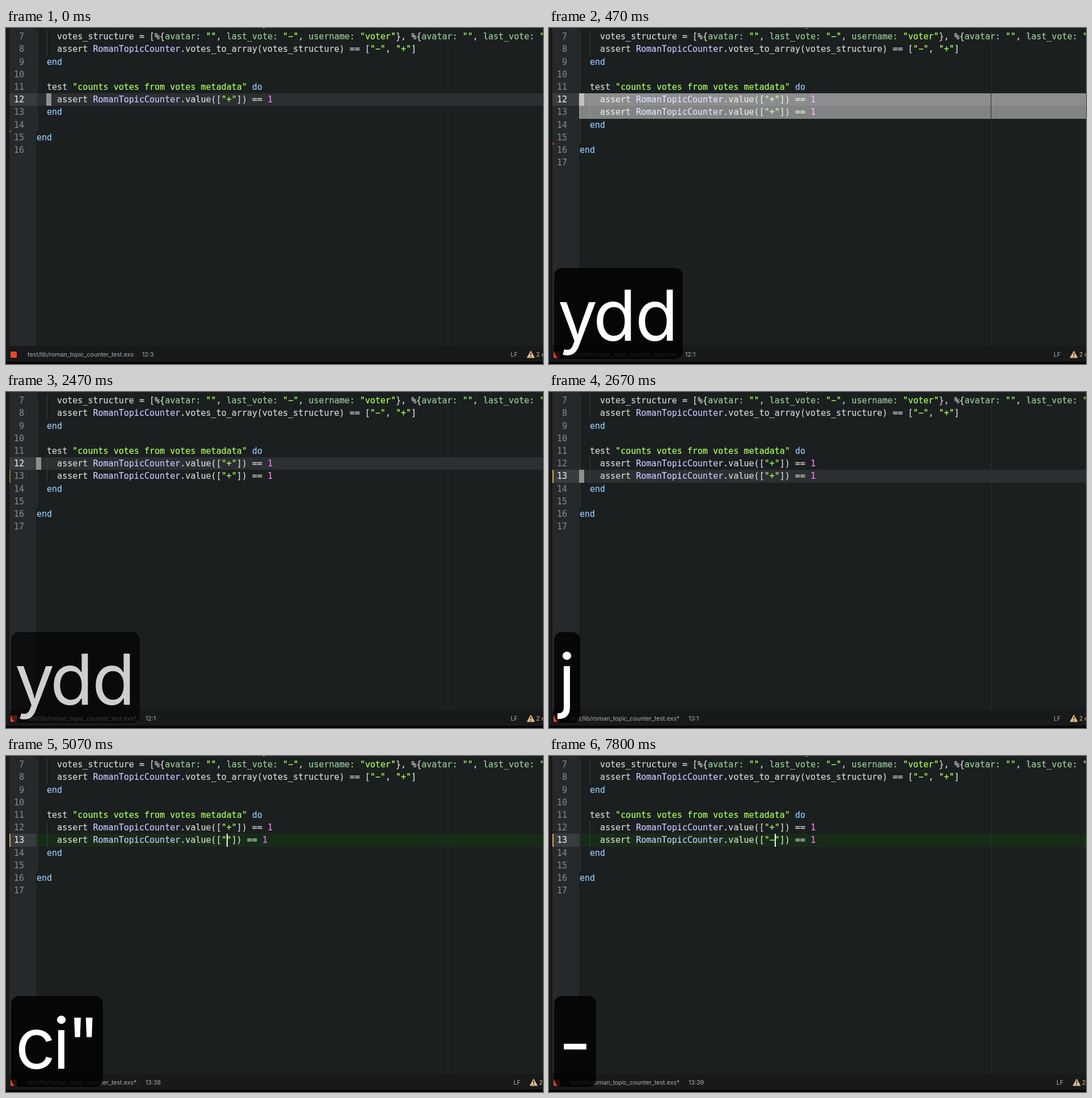
Write an HTML page that moves like this. It is 947 px wide and 592 px high and loops after 8000 ms.

```html
<!DOCTYPE html>
<html lang="en">
<head>
<meta charset="utf-8">
<title>Editor key presses</title>
<style>
  html, body { margin: 0; width: 100%; height: 100%; overflow: hidden; background: #17191a; }
  #stage { position: relative; width: 947px; height: 592px; overflow: hidden; background: #17191a; }
  #stage div, #stage svg, #stage i { position: absolute; }
  #editor { left: 6px; top: 0; width: 941px; height: 560px; background: #1b1f1f; }
  #gutter { left: 6px; top: 0; width: 47px; height: 560px; background: #25292b; }
  #view { left: 0; top: 0; width: 947px; height: 560px; overflow: hidden; }
  #wrap { left: 779px; top: 0; width: 1px; height: 560px; background: #2a2e2e; }
  .row { left: 53px; right: 0; height: 22.2px; background: #2b2f31; }
  .row.insert { background: #172c18; }
  .mark { left: 6px; width: 47px; height: 22.2px; background: #383c3f; }
  .guide { width: 1px; background: #3b4041; }
  .line, .num {
    height: 22.2px; white-space: pre; color: #d3d6d5;
    font: 15.04px/23px "DejaVu Sans Mono", monospace; font-variant-ligatures: none;
    -webkit-text-stroke: .2px currentColor;
  }
  .line { left: 53.9px; }
  .num { left: 6px; width: 26px; text-align: right; color: #7e8384; }
  .num.on { color: #e2e4e4; }
  .str { color: #a8ff60; }
  .key { color: #99cc99; }
  .word { color: #96cbfe; }
  .mod { color: #c6c5fe; }
  .int { color: #ff73fd; }
  .cursor { width: 9px; height: 22.2px; background: #8f8f8f; }
  .cursor.insert { width: 1.5px; background: #f4f6f4; }
  .flash { left: 53px; right: 0; height: 44.4px; background: rgba(255, 255, 255, .45); }
  .added { left: 6px; width: 2px; height: 22.2px; background: #857a34; }
  .added.on { background: #d0ab4c; }
  .removed { left: 6px; border: 3px solid transparent; border-left: 4px solid #9b3d22; border-right: 0; }
  #bar { left: 0; top: 560px; width: 947px; height: 28px; background: #17191b; }
  #base { left: 0; top: 588px; width: 947px; height: 4px; background: #050505; }
  #bar div { top: 0; white-space: pre; color: #abafb0; font: 10.65px/31px Inter, sans-serif; }
  #icon { left: 8px; top: 10px; width: 11px; height: 11px; background: #e5482d; }
  #bar #count { color: #e3bd88; left: 45px; }
  #alert { left: 28px; top: 8px; }
  #caps { left: 0; top: 0; }
</style>
</head>
<body>
<div id="stage">
  <div id="editor"></div>
  <div id="gutter"></div>
  <div id="view"></div>
  <div id="wrap"></div>
  <div id="bar">
    <i id="icon"></i>
    <div id="file" style="left:38px"></div>
    <div id="pos"></div>
    <div id="right">
      <div>LF</div>
      <svg id="alert" width="15" height="14">
        <path d="M7.5 1.2 14 12.8H1Z" fill="#e3bd88" stroke="#e3bd88" stroke-linejoin="round"/>
        <path d="M7.5 4.6V8.6M7.5 10V11.6" stroke="#17191b" stroke-width="1.6"/>
      </svg>
      <div id="count">2 deprecations</div>
    </div>
  </div>
  <div id="base"></div>
  <svg id="caps" width="947" height="592" fill="#fff" text-anchor="middle"
       font-family="Inter, sans-serif" font-size="124"></svg>
</div>
<script>
const LOOP = 8000, ROW = 22.2, COL = 9.05, LEFT = 53.9;
const $ = id => document.getElementById(id);
const rowTop = n => 115.2 + (n - 12) * ROW;

// Key caps: box width and the centre of each glyph
const CAPS = {
  "y": [82, [50.5]],
  "yd": [154, [50.5, 116]],
  "ydd": [227, [50.5, 116, 190]],
  "j": [46, [31.5]],
  "c": [84, [52]],
  "ci": [112, [52, 97.5]],
  'ci"': [162, [52, 97.5, 136.5]],
  "-": [74, [46]]
};
const cap = (text, opacity = 1, slot = 0) => ({ text, opacity, slot });

// Each step changes part of the state from its time onwards
const STEPS = [
  [0, { caps: [], copy: null, row: 12, col: 3, flash: false, dirty: false, insert: false, blink: true }],
  [70, { caps: [cap("y")] }],
  [270, { caps: [cap("yd")] }],
  [330, { caps: [cap("ydd")] }],
  [470, { copy: "+", col: 1, flash: true }],
  [600, { flash: false }],
  [800, { dirty: true }],
  [2470, { caps: [cap("ydd", .78)] }],
  [2530, { caps: [cap("ydd", .5, 1), cap("j")] }],
  [2600, { caps: [cap("ydd", .22, 1), cap("j")], row: 13 }],
  [2670, { caps: [cap("j")] }],
  [4530, { caps: [cap("j", .78)] }],
  [4600, { caps: [cap("j", .5, 1), cap("c")] }],
  [4670, { caps: [cap("j", .22, 1), cap("c")] }],
  [4730, { caps: [cap("c")] }],
  [4800, { caps: [cap("ci")] }],
  [4870, { caps: [cap('ci"')] }],
  [5070, { copy: "", col: 38, insert: true }],
  [5600, { blink: false }],
  [6000, { blink: true, caps: [cap('ci"', 1, 1), cap("-")] }],
  [6130, { copy: "−", col: 39 }],
  [6600, { blink: false }],
  [7000, { blink: true, caps: [cap('ci"', .78, 1), cap("-")] }],
  [7070, { caps: [cap('ci"', .55, 1), cap("-")] }],
  [7130, { caps: [cap('ci"', .35, 1), cap("-")] }],
  [7200, { caps: [cap('ci"', .15, 1), cap("-")] }],
  [7270, { caps: [cap("-")] }],
  [7400, { blink: false }],
  [7800, { blink: true }]
];

const TOKEN = /("[^"]*"?)|(\w+:)|\b(do|end)\b|\b([A-Z]\w*)|\b(\d+)\b/g;
const KINDS = ["str", "key", "word", "mod", "int"];
const paint = code => code.replace(TOKEN, (text, ...groups) =>
  `<span class="${KINDS[groups.findIndex(g => g !== undefined)]}">${text}</span>`);

const check = sign => `    assert RomanTopicCounter.value(["${sign}"]) == 1`;

function codeLines(copy) {
  return [
    '  test "turns the votes structures into array" do',
    '    votes_structure = [%{avatar: "", last_vote: "−", username: "voter"}, %{avatar: "", last_vote: "+"',
    '    assert RomanTopicCounter.votes_to_array(votes_structure) == ["−", "+"]',
    "  end",
    "",
    '  test "counts votes from votes metadata" do',
    check("+"),
    ...(copy === null ? [] : [check(copy)]),
    "  end",
    "",
    "end",
    ""
  ];
}

const box = (name, top, style = "", body = "") =>
  `<div class="${name}" style="top:${top}px;${style}">${body}</div>`;

const guide = (col, from, to) =>
  box("guide", rowTop(from), `left:${LEFT + col * COL}px;height:${(to - from) * ROW}px`);

function drawView(s) {
  const mode = s.insert ? " insert" : "";
  const top = rowTop(s.row);
  const last = s.copy === null ? 15 : 16;
  const x = LEFT + (s.col - 1) * COL + (s.insert ? 0.5 : -0.6);
  let html = box("row" + mode, top) + box("mark", top) +
    guide(0, 7, last) + guide(2, 7, 9) + guide(2, 12, last - 2);
  if (s.blink) html += box("cursor" + mode, top, `left:${x}px`);
  codeLines(s.copy).forEach((code, i) => {
    const n = i + 6;
    html += box("num" + (n === s.row ? " on" : ""), rowTop(n), "", n) +
      box("line", rowTop(n), "", paint(code));
  });
  html += s.dirty
    ? box("added" + (s.row === 13 ? " on" : ""), rowTop(13))
    : box("removed", rowTop(last) - 3);
  if (s.flash) html += box("flash", rowTop(12));
  $("view").innerHTML = html;
}

function drawBar(s) {
  $("file").textContent = "test/lib/roman_topic_counter_test.exs" + (s.dirty ? "*" : "");
  $("pos").textContent = s.row + ":" + s.col;
  $("pos").style.left = (s.dirty ? 246 : 240) + "px";
  $("right").style.left = (s.insert ? 895 : 890) + "px";
}

function drawCaps(s) {
  $("caps").innerHTML = s.caps.map(({ text, opacity, slot }) => {
    const [width, xs] = CAPS[text];
    return `<g opacity="${opacity}" transform="translate(0 ${-169.2 * slot})">
      <rect x="9" y="423" width="${width}" height="160" rx="14" fill="#000" fill-opacity=".82"/>
      <text x="${xs.join(" ")}" y="551.4">${text}</text></g>`;
  }).join("");
}

let shown = -1;
function frame(now) {
  const t = now % LOOP;
  const count = STEPS.filter(([at]) => at <= t).length;
  if (count !== shown) {
    shown = count;
    const state = Object.assign({}, ...STEPS.slice(0, count).map(step => step[1]));
    drawView(state);
    drawBar(state);
    drawCaps(state);
  }
  requestAnimationFrame(() => frame(performance.now() - start));
}
const start = performance.now();
frame(0);
</script>
</body>
</html>
```
